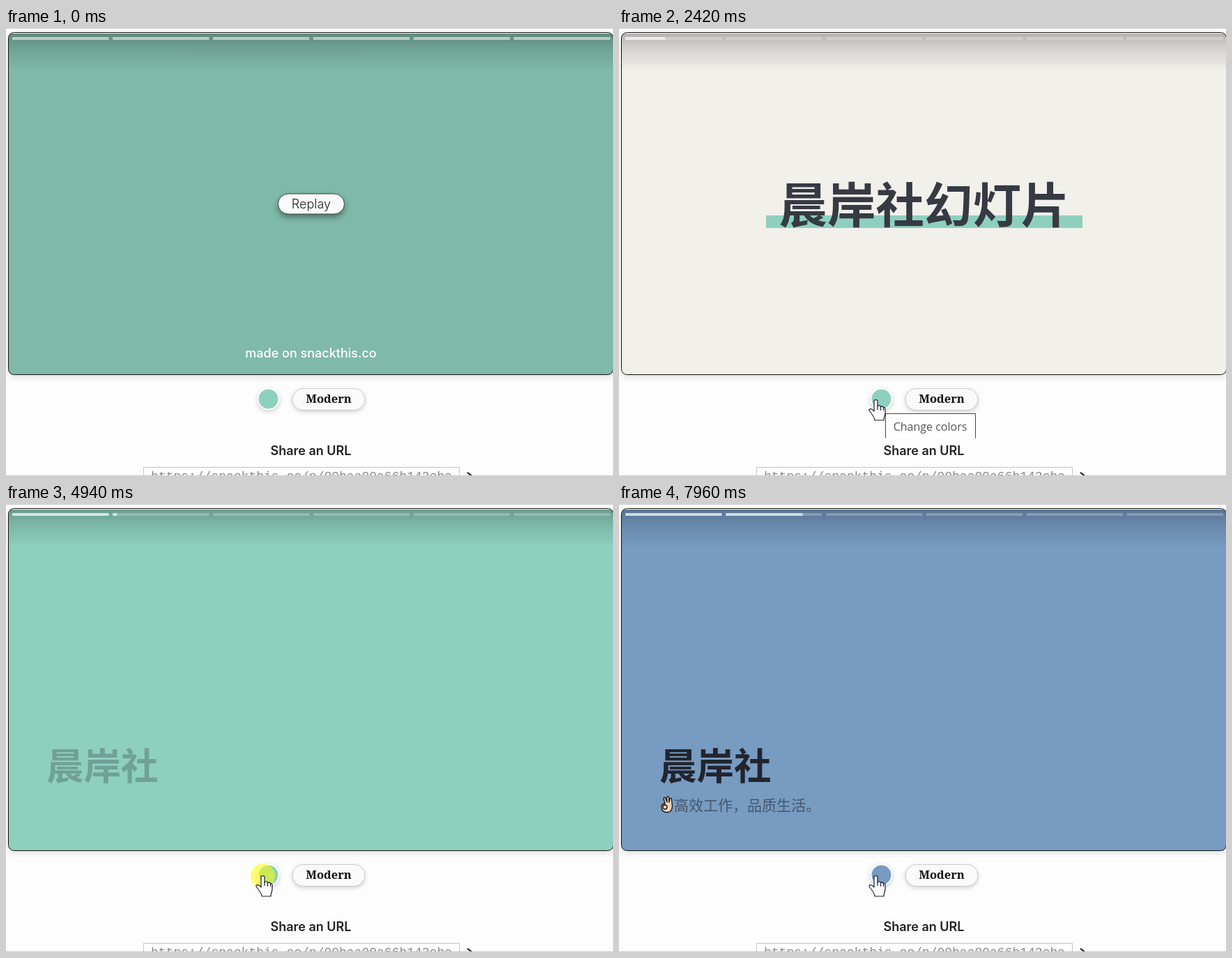
Animation, 871 px wide and 643 px high, one loop 8 s. Source, as an HTML page:

```html
<!DOCTYPE html>
<html lang="zh-CN">
<head>
<meta charset="utf-8">
<title>Slides</title>
<style>
  html, body { margin: 0; width: 100%; height: 100%; overflow: hidden; background: #fdfdfd; }
  svg { display: block; width: 871px; height: 643px; }
  text { font: 18px Inter, sans-serif; }
  .mid { text-anchor: middle; }
  .cjk { font-family: "Noto Sans CJK SC", "Noto Sans CJK", sans-serif; font-weight: 700; }
  .fill, #mark { transform-box: fill-box; transform-origin: left; }
  .soft { filter: drop-shadow(0 2px 3px rgba(0, 0, 0, .2)); }
</style>
</head>
<body>
<svg viewBox="0 0 871 643">
  <defs>
    <linearGradient id="shade" x2="0" y2="1">
      <stop offset="0" stop-opacity=".25"/>
      <stop offset=".4" stop-opacity=".12"/>
      <stop offset="1" stop-opacity="0"/>
    </linearGradient>
    <clipPath id="card"><rect x="3.5" y="6.5" width="868" height="491" rx="8"/></clipPath>
  </defs>

  <rect width="871" height="643" fill="#fdfdfd"/>
  <rect width="871" height="1" fill="#ccc"/>

  <rect x="3.5" y="6.5" width="868" height="491" rx="8" fill="#fff"
        style="filter:drop-shadow(0 3px 5px rgba(0,0,0,.14))"/>
  <g clip-path="url(#card)">
    <rect id="slide" x="3" y="8" width="869" height="490" fill="#8ed0be"/>

    <g id="first" opacity="0">
      <rect id="mark" x="211" y="269" width="454" height="18" fill="#8ed0bd"/>
      <text class="cjk mid" x="438" y="280" style="font-size:69.5px" fill="#363a43">晨岸社幻灯片</text>
    </g>

    <text id="second" class="cjk" x="58" y="396" style="font-size:53.5px" fill="#22252e" opacity="0">晨岸社</text>
    <g id="sub" opacity="0">
      <g fill="#f0d2b8" stroke="#111" stroke-width="1.3" stroke-linejoin="round">
        <path d="M66 430L64 423Q64 420 66.500 422L69 428 68.500 421Q70 418.500 71.500 421L72 428 73 423Q75.500 421 75.500 424L76.500 434Q76 442.500 69 442.500Q61 442.500 61 435Q61 430 66 430Z"/>
        <circle cx="66" cy="435" r="3"/>
      </g>
      <text class="cjk" x="79" y="440" style="font-size:21px;font-weight:400" fill="#22252e" fill-opacity=".58">高效工作，品质生活。</text>
    </g>

    <rect x="3" y="8" width="869" height="54" fill="url(#shade)"/>
    <g id="bars" fill="#fff"></g>

    <g id="ending">
      <rect x="3" y="8" width="869" height="490" fill-opacity=".11"/>
      <rect x="390.500" y="238" width="95" height="29" rx="14.500" fill="#fafafa" stroke="#444"
            style="filter:drop-shadow(0 4px 4px rgba(0,0,0,.4))"/>
      <text class="mid" x="438" y="259" style="font-weight:300" fill="#222">Replay</text>
      <text class="mid" x="437.500" y="473" style="font-weight:500" fill="#fff">made on snackthis.co</text>
    </g>
  </g>
  <rect x="3.500" y="6.500" width="868" height="491" rx="8" fill="none" stroke="#111"/>

  <circle class="soft" cx="376.500" cy="532.500" r="16" fill="#fff"/>
  <circle id="swatch" cx="376.500" cy="532.500" r="14" fill="#8ed0be"/>
  <rect class="soft" x="411" y="517.500" width="104" height="31" rx="15.500" fill="#fafafa"/>
  <rect x="411" y="517.500" width="104" height="31" rx="15.500" fill="none" stroke="#ccc"/>
  <text class="mid" x="463" y="538" style="font:700 16.500px 'Noto Serif',serif" fill="#111">Modern</text>

  <text class="mid" x="437.500" y="613" style="font-weight:600" fill="#222">Share an URL</text>
  <rect x="197.500" y="630.500" width="453" height="30" fill="#fff" stroke="#c4c4c4"/>
  <text x="208" y="649" style="font-family:'Liberation Mono',monospace" fill="#888">https://snackthis.co/p/00baa00a66b142cba</text>
  <path d="M662 638L671 645" stroke="#111" stroke-width="2"/>
  <rect y="642" width="871" height="1" fill="#ccc"/>

  <g id="tip" opacity="0">
    <rect x="382" y="553" width="130" height="36" fill="#fff"/>
    <path d="M382.500 589V553.500H511.500V589" fill="none" stroke="#444"/>
    <text class="mid" x="446.500" y="578" style="font:16px 'Open Sans',sans-serif" fill="#555">Change colors</text>
  </g>

  <g id="pointer" opacity="0">
    <circle id="press" cx=".5" r="17.500" fill="#ff0" fill-opacity=".55" opacity="0"/>
    <path id="arrow" d="M.5.500V23.500L6 18.500 9.500 26 13.500 24.500 10 17H17Z" fill="#fff" stroke="#111"/>
    <g id="hand" opacity="0" fill="#fff" stroke="#1a1a30" stroke-width="1.200" stroke-linejoin="round">
      <path d="M-2 1.500C-2-1 3-1 3 1.500V9C4 7 7.500 7.500 7.500 10C8.500 8.500 11.500 9 11.500 11C12.500 10 14 11 14 13V19C14 22 12 24 12 29H-1C-1 25-5 20-9 15C-9.500 12-6 11.500-2 16Z"/>
      <path d="M3 8V14M7.500 10V15M11.500 11V15" fill="none"/>
    </g>
  </g>
</svg>

<script>
const LOOP = 8000;
const TEAL = '#8ed0be', CREAM = '#f1f0eb', BLUE = '#779bc1';
const HOLD = 'steps(1, end)', EASE = 'ease-in-out';

const bars = document.getElementById('bars');
for (let i = 0; i < 6; i++) {
  const box = `x="${9.2 + i * 143.9}" y="13" width="138.300" height="4"`;
  bars.innerHTML += `<rect ${box} opacity=".25"/><rect class="fill" id="fill${i}" ${box} opacity=".62"/>`;
}

// steps: [time in ms, value]; the outer values fill the ends of the loop
function play(id, prop, easing, ...steps) {
  const all = [[0, steps[0][1]], ...steps, [LOOP, steps.at(-1)[1]]];
  const frames = all.map(([time, value]) => ({ offset: time / LOOP, [prop]: value, easing }));
  document.getElementById(id).animate(frames, { duration: LOOP, iterations: Infinity });
}
const at = (x, y) => `translate(${x}px, ${y}px)`;
const scale = x => `scaleX(${x})`;

play('slide', 'fill', HOLD, [0, TEAL], [840, CREAM], [4765, TEAL], [5060, BLUE]);
play('swatch', 'fill', HOLD, [0, TEAL], [5060, BLUE]);
play('ending', 'opacity', HOLD, [0, 1], [840, 0]);

for (let i = 0; i < 6; i++) {
  const start = [780, 4765][i];
  const steps = [[0, scale(1)], [839, scale(1)]];
  if (i === 0) steps.push([840, scale(.015)], [4765, scale(1)]);
  else steps.push([840, scale(0)]);
  if (i === 1) steps.push([start, scale(0)], [LOOP, scale((LOOP - start) / 4000)]);
  play('fill' + i, 'transform', 'linear', ...steps);
}

play('first', 'opacity', 'linear', [800, 0], [850, .02], [1400, 1], [4300, 1], [4410, .95], [4700, 0]);
play('first', 'transform', 'ease-out', [840, at(0, 15)], [1500, at(0, 0)]);
play('mark', 'transform', EASE, [1400, scale(0)], [2100, scale(1)]);
play('mark', 'opacity', 'linear', [4280, 1], [4410, .8], [4600, 0]);
play('second', 'opacity', 'linear', [4780, 0], [4940, .27], [5380, 1]);
play('sub', 'opacity', 'linear', [5200, 0], [5700, 1]);

play('tip', 'opacity', HOLD, [0, 0], [2100, 1], [4860, 0]);
play('press', 'opacity', HOLD, [0, 0], [775, 1], [840, 0], [4860, 1], [5020, 0]);
play('hand', 'opacity', HOLD, [0, 0], [560, 1], [840, 0], [1440, 1]);
play('arrow', 'opacity', HOLD, [0, 1], [560, 0], [840, 1], [1440, 0]);
play('pointer', 'opacity', HOLD, [0, 0], [70, 1]);
play('pointer', 'transform', EASE,
  [70, at(624, 532)], [630, at(415, 252)], [950, at(415, 252)],
  [1500, at(371, 537)], [1700, at(368, 534)]);
</script>
</body>
</html>
```
